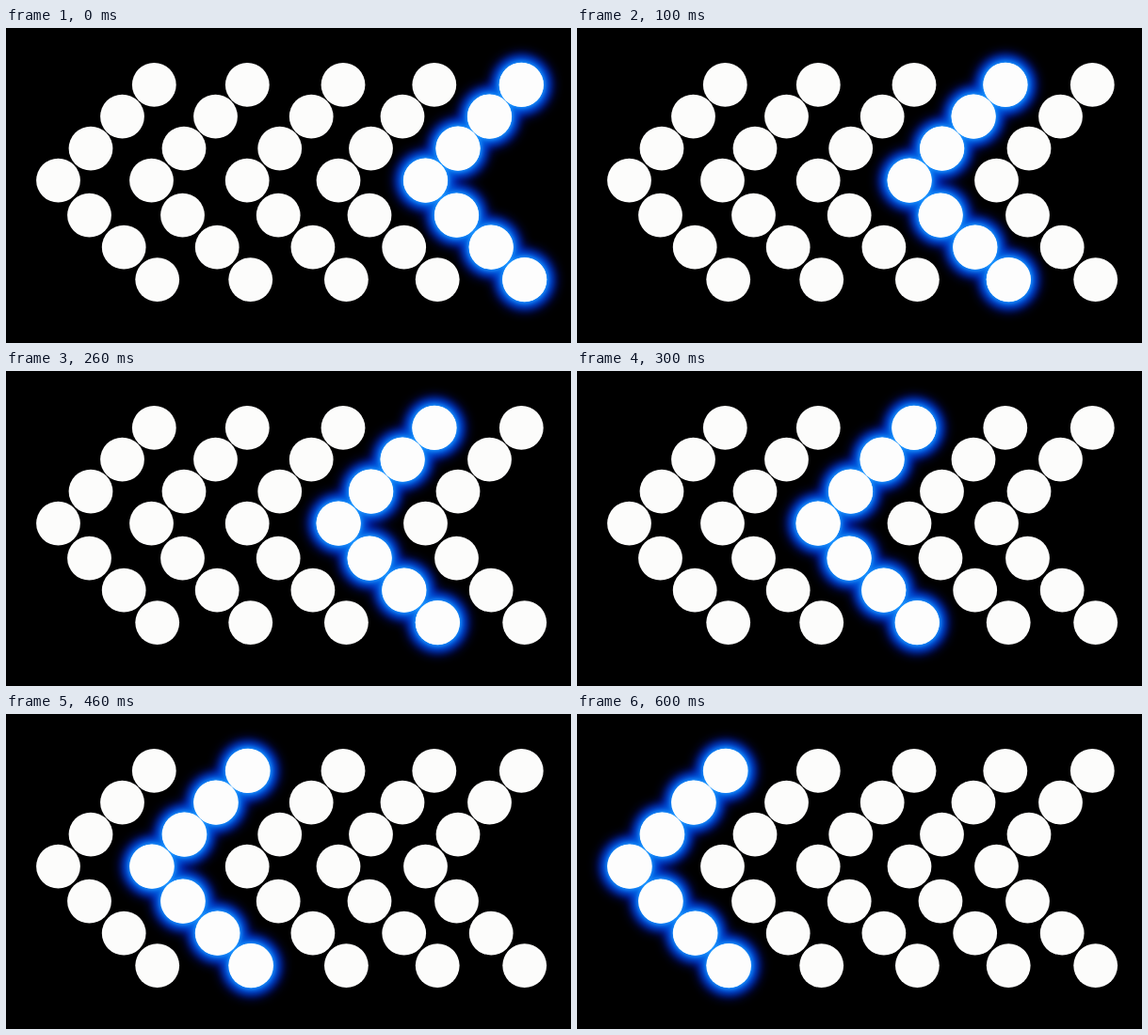
Write an HTML page that moves like this. It is 600 by 335 pixels and loops after 0.7 s.

```html
<!DOCTYPE html>
<html lang="en">
<head>
<meta charset="utf-8">
<title>Chevron lights</title>
<style>
  html, body { margin: 0; width: 100%; height: 100%; overflow: hidden; background: #000; }
  svg { display: block; width: 600px; height: 335px; }
  .dots { fill: #fcfcfb; }
  .lit { visibility: hidden; animation: 700ms step-end infinite; }
  .one { animation-name: one; }
  .two { animation-name: two; }
  .haze { fill: #0016b0; filter: blur(6px); }
  .halo { fill: #0066e6; filter: blur(4.5px); }
  .rim { fill: #1e96ff; filter: blur(2px); }
  .core { fill: #fdfdfd; }
  @keyframes one { 0% { visibility: visible; } 14.2857%, 100% { visibility: hidden; } }
  @keyframes two { 0% { visibility: visible; } 28.5714%, 100% { visibility: hidden; } }
</style>
</head>
<body>
<svg viewBox="0 0 600 335"></svg>
<script>
  const LOOP = 700;
  // Dot offsets from the tip of a chevron
  const dots = [[0, 0], [34.5, -34], [68, -68], [101.8, -101.7], [33, 37], [69.7, 71], [105.2, 105.5]];
  // Tip x, time it lights up, how long, and sideways nudge while lit
  const chevrons = [
    { x: 55.5, start: 600, span: 'one', nudge: 0.7 },
    { x: 154.5, start: 400, span: 'two', nudge: 0.7 },
    { x: 256.2, start: 300, span: 'one', nudge: -0.2 },
    { x: 353, start: 100, span: 'two', nudge: 0.2 },
    { x: 445.5, start: 0, span: 'one', nudge: 0 }
  ];
  // Glow layers from the outside in, with dot radius
  const glow = [['haze', 33], ['halo', 29], ['rim', 24.8]];

  const chevron = (x, r, cls) => `<g class="${cls}">` + dots.map(([dx, dy]) =>
    `<circle cx="${x + dx}" cy="${162.1 + dy}" r="${r}"/>`).join('') + '</g>';

  const lit = (c, layers) =>
    `<g class="lit ${c.span}" style="animation-delay:${c.start - LOOP}ms">` +
    layers.map(([cls, r]) => chevron(c.x + c.nudge, r, cls)).join('') + '</g>';

  const glows = chevrons.map(c => lit(c, glow));
  const plain = chevrons.map(c => chevron(c.x, 23.4, 'dots'));
  const cores = chevrons.map(c => lit(c, [['core', 23.6]]));

  document.querySelector('svg').innerHTML = [...glows, ...plain, ...cores].join('');
</script>
</body>
</html>
```
